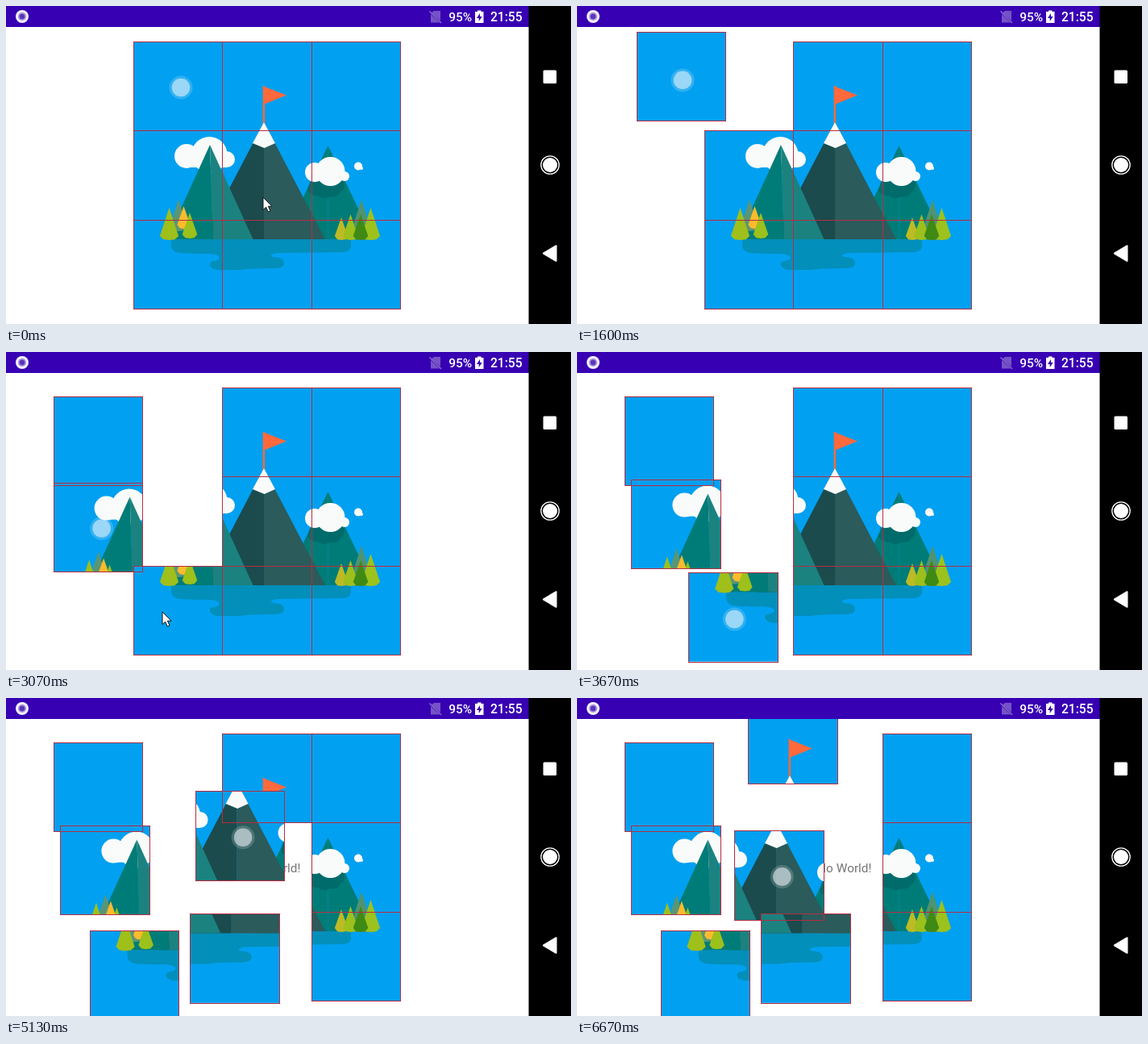
An HTML page with a canvas for the animation above (6.74 s loop, 701 px wide and 394 px high).

```html
<!DOCTYPE html>
<html lang="en">
<head>
<meta charset="utf-8">
<title>Puzzle</title>
<style>
html, body { margin: 0; width: 100%; height: 100%; overflow: hidden; background: #fff; }
canvas { display: block; width: 701px; height: 394px; }
</style>
</head>
<body>
<canvas id="stage" width="701" height="394"></canvas>
<script>
const g = document.getElementById('stage').getContext('2d');
const LOOP = 6740, FPS = 15;
const X0 = 158, Y0 = 44, SIZE = 110.4, SHORE = 289;
const TEAL = '#007c78', SNOW = '#f9fbfa', BAR = '#3700b3', EDGE = '#b52d43';
const GRAB = { x: 59, y: 57 }, LEAD = 25;

// Straight strokes of the finger: piece, start, end, target x, target y
const moves = [
  [0, 0, 600, X0, Y0], [0, 600, 1600, 74, 32], [0, 1600, 1800, 58.6, 55],
  [3, 2066, 2600, 88, 180], [3, 2600, 3067, 58.6, 162], [3, 3067, 3270, 67.4, 158],
  [6, 3400, 4134, 103.6, 288],
  [7, 4399, 4400, 259.3, 241.4], [7, 4400, 4800, 228.2, 267.4],
  [4, 4930, 5133, 235, 115.3], [4, 5133, 5534, 236, 122],
  [1, 5740, 6270, 212.4, -4],
  [4, 6400, 6667, 195.4, 164.4]
];

const mix = (a, b, k) => a + (b - a) * k;

function fillPath(color, d) {
  g.fillStyle = color;
  g.fill(new Path2D(d));
}

function poly(color, ...p) {
  g.fillStyle = color;
  g.beginPath();
  for (let i = 0; i < p.length; i += 2) g.lineTo(p[i], p[i + 1]);
  g.closePath();
  g.fill();
}

function disc(color, x, y, r) {
  g.fillStyle = color;
  g.beginPath();
  g.arc(x, y, r, 0, 7);
  g.fill();
}

function rect(color, x, y, w, h) {
  g.fillStyle = color;
  g.fillRect(x, y, w, h);
}

function text(s, x, y, font, color) {
  g.font = font + ' Roboto, sans-serif';
  g.fillStyle = color;
  g.fillText(s, x, y);
}

function peak(x, top, half, left, right, ridge = x) {
  poly(left, x, top, ridge, SHORE, x - half, SHORE);
  poly(right, x, top, x + half, SHORE, ridge, SHORE);
}

function tree(color, x, top, base = 290) {
  const half = (base - top) * .29;
  poly(color, x, top, x + half, base - 5, x + half * .6, base - .8, x, base,
    x - half * .6, base - .8, x - half, base - 5);
}

function picture() {
  rect('#02a0f0', X0, Y0, 3 * SIZE, 3 * SIZE);
  fillPath('#028fba', 'M205 289H428V297Q428 304 418 305L336 306Q325 308 331 311Q345 311 345 319Q345 325 330 325' +
    'Q302 325 290 327H262Q250 324 254 317Q268 315 264 310Q258 306 240 307L215 306Q205 304 205 296Z');

  peak(399.5, 173, 56, TEAL, TEAL);
  fillPath('#006b6b', 'M378 215H420V222Q419 229 415 230Q412 238 402 236Q394 241 387 235Q379 236 374 229Z');

  rect('#f26a3d', 318.6, 99, 2.6, 48);
  poly('#ff693c', 319.5, 99.5, 348, 110.5, 319.5, 122);
  peak(320, 144, 76, '#1b4b4d', '#2b5b5b');
  poly(SNOW, 320, 144, 334, 170, 320.5, 176, 306, 170);

  disc(SNOW, 224, 186, 15);
  disc(SNOW, 252.3, 184.3, 22.3);
  disc(SNOW, 274, 190, 10);
  rect(SNOW, 224, 186, 50, 14);
  peak(253, 172, 53.5, TEAL, '#1b8280', 257);
  disc(SNOW, 383, 206, 12);
  disc(SNOW, 402.5, 205, 18);
  disc(SNOW, 420, 211, 6);
  disc(SNOW, 437, 198.5, 5);
  disc(SNOW, 441, 201, 2);

  tree('#5a9676', 214, 240, 279);
  tree('#fbbb2c', 220.5, 248, 276);
  tree('#9fbf1a', 202.5, 250);
  tree('#9cc01c', 228, 256, 288);
  tree('#4e9372', 441, 240);
  tree('#bdbb25', 416, 262);
  tree('#9cc01c', 427.5, 258);
  tree('#9cc21d', 452.5, 250);
  tree('#3f8a14', 440, 258);
}

function layout(t) {
  const pieces = Array.from({ length: 9 }, (_, i) => {
    const x = X0 + SIZE * (i % 3), y = Y0 + SIZE * Math.floor(i / 3);
    return { x, y, homeX: x, homeY: y };
  });
  for (const [id, start, end, x, y] of moves) {
    if (t < start) break;
    const p = pieces[id], k = Math.min(1, (t - start) / (end - start));
    p.x = mix(p.x, x, k);
    p.y = mix(p.y, y, k);
  }
  return pieces;
}

function bounds(p) {
  const x = Math.round(p.x), y = Math.round(p.y);
  return [x, y, Math.round(p.x + SIZE) - x, Math.round(p.y + SIZE) - y];
}

function drawPiece(p) {
  const [x, y, w, h] = bounds(p);
  g.save();
  g.beginPath();
  g.rect(x, y, w + 1, h + 1);
  g.clip();
  g.translate(p.x - p.homeX, p.y - p.homeY);
  picture();
  g.restore();
}

function outline(p) {
  const [x, y, w, h] = bounds(p);
  g.strokeStyle = EDGE;
  g.strokeRect(x + .5, y + .5, w, h);
}

function finger(t) {
  const active = moves.find(([, start, end]) => t >= start && t <= end);
  if (!active) return;
  const p = layout(t + LEAD)[active[0]];
  disc('rgba(255,255,255,.18)', p.x + GRAB.x, p.y + GRAB.y, 14.5);
  disc('rgba(240,245,250,.56)', p.x + GRAB.x, p.y + GRAB.y, 11.3);
}

function cursor(x, y) {
  const arrow = new Path2D('M0 0V15.5L3.6 12.2L6.2 18L9 16.8L6.4 11.2H11Z');
  g.save();
  g.translate(x, y);
  g.fillStyle = '#fff';
  g.fill(arrow);
  g.strokeStyle = '#111';
  g.stroke(arrow);
  g.restore();
}

function statusBar() {
  rect(BAR, 0, 0, 649, 26);
  disc('#f4f0fb', 20, 13, 8);
  disc('#a58bdc', 20, 13, 5);
  disc('#5a35b8', 20, 13, 3.2);
  fillPath('#7553c6', 'M531 6H539V18L528 8.5ZM527 10L538 20.5H527Z');
  fillPath('#8a6dcf', 'M525 7L526 6L540.5 20.5L539.5 21.5Z');
  text('95%', 549.2, 19, '500 15.5px', '#fff');
  fillPath('#fff', 'M585 5.5H589.5V7H592.5V21H582V7H585Z');
  poly(BAR, 588, 9, 584, 15, 586.7, 15, 586.7, 19, 590.7, 13, 588, 13);
  text('21:55', 601, 19, '500 15.6px', '#fff');
}

function navBar() {
  rect('#000', 648.5, 0, 53, 394);
  g.fillStyle = g.strokeStyle = '#fff';
  g.beginPath();
  g.roundRect(666.5, 79.5, 16.5, 16.5, 1.5);
  g.fill();
  disc('#fff', 675, 197, 9);
  g.lineWidth = 1.3;
  g.beginPath();
  g.arc(675, 197, 11.2, 0, 7);
  g.stroke();
  fillPath('#fff', 'M666.5 305.4L682 296.3Q683.5 295.7 683.5 297.3V315.7Q683.5 317.3 682 316.7L666.5 307.6Q665 306.5 666.5 305.4Z');
}

function draw(t) {
  g.lineWidth = 1;
  rect('#fff', 0, 0, 701, 394);
  g.textAlign = 'center';
  text('Hello World!', 324, 216, '15.4px', '#757575');
  g.textAlign = 'left';

  const pieces = layout(t);
  pieces.forEach(drawPiece);
  pieces.forEach(outline);
  finger(t);

  if (t < 640) cursor(319, 237);
  if (t > 2000 && t < 3300) {
    const k = (t - 2600) / 467;
    cursor(mix(206, 194, k), mix(317, 322, k));
  }
  statusBar();
  navBar();
}

const begin = performance.now();
function tick() {
  const ms = (performance.now() - begin) % LOOP;
  draw(Math.floor(ms * FPS / 1000 + .08) * 1000 / FPS);
  requestAnimationFrame(tick);
}
tick();
</script>
</body>
</html>
```
